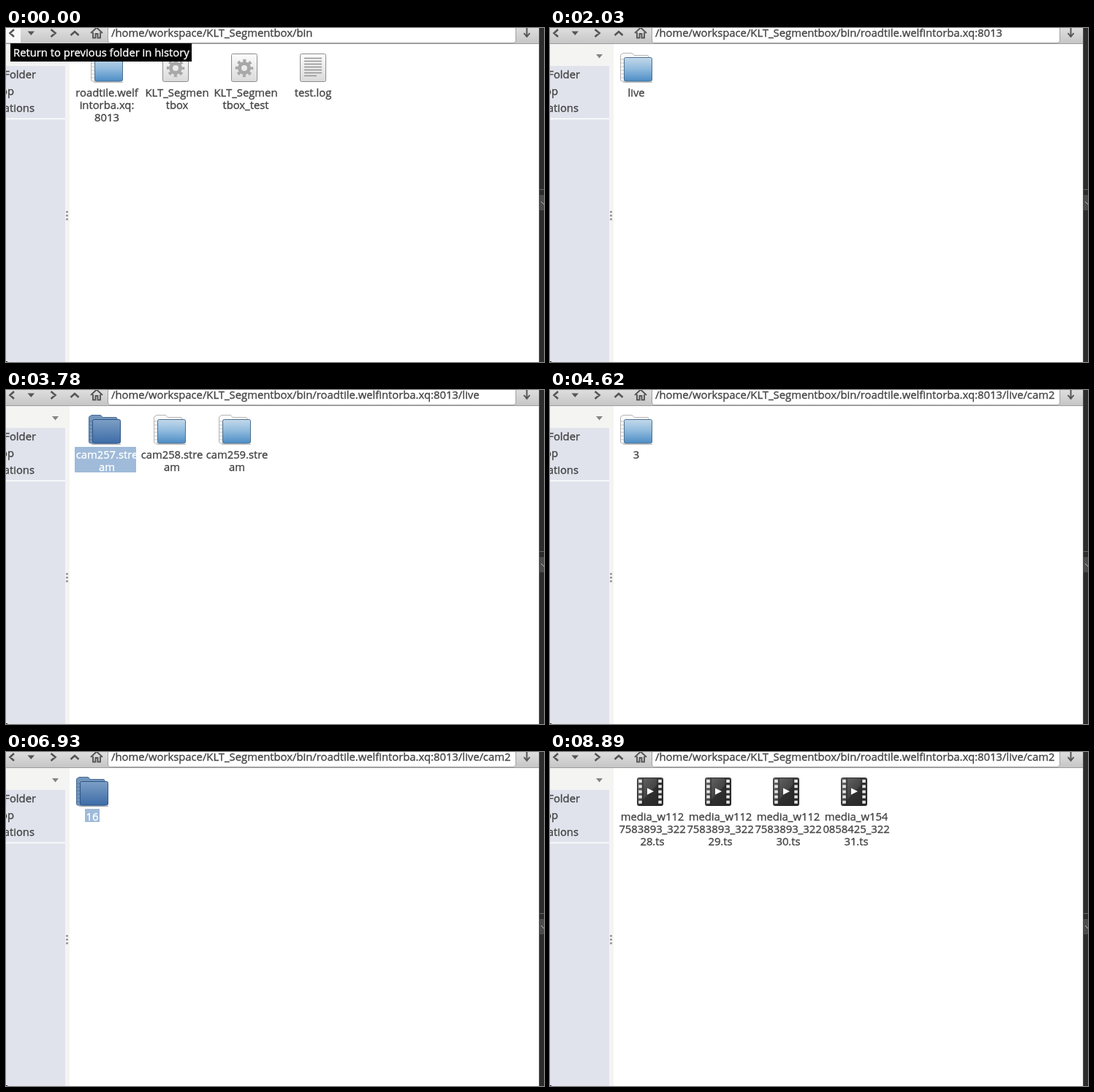
An HTML page for the animation above (9.1 s loop, 736 by 458 pixels).

```html
<!DOCTYPE html>
<html lang="en">
<head>
<meta charset="utf-8">
<style>
  html, body { margin: 0; width: 100%; height: 100%; overflow: hidden; background: #fff; }
  svg { display: block; width: 736px; height: 458px; font: 14.8px "Open Sans", "Noto Sans", sans-serif; color: #444; }
  text { fill: currentColor; stroke: currentColor; stroke-width: .35; }
  .line { fill: none; stroke: #555; stroke-width: 2.6; }
  .paper { fill: url(#paper); stroke: #8c8c8c; }
  .label { text-anchor: middle; }
</style>
</head>
<body>
<svg viewBox="0 0 736 458">
  <defs>
    <linearGradient id="bar" x2="0" y2="1"><stop stop-color="#dedede"/><stop offset="1" stop-color="#c6c6c6"/></linearGradient>
    <linearGradient id="paper" x2="0" y2="1"><stop stop-color="#fcfcfc"/><stop offset="1" stop-color="#dadada"/></linearGradient>
    <linearGradient id="blue" x2="0" y2="1"><stop stop-color="#c3d9ea"/><stop offset=".5" stop-color="#8db8dc"/><stop offset="1" stop-color="#4c8dc5"/></linearGradient>
    <linearGradient id="navy" x2="0" y2="1"><stop stop-color="#7c9fc5"/><stop offset="1" stop-color="#3d6ca8"/></linearGradient>
    <linearGradient id="dark" x2="1" y2="1"><stop stop-color="#6a6a6a"/><stop offset=".5" stop-color="#444"/><stop offset=".52" stop-color="#303030"/><stop offset="1" stop-color="#262626"/></linearGradient>
    <clipPath id="entry"><path d="M140 0H695V20H140z"/></clipPath>
    <path id="back" d="M-21.500 71V37.500q0-1.500 1.500-1.500l2-1.500h12.500l2.500 3h18q2 0 2 2V73H-19.500q-2 0-2-2z"/>
    <path id="ticks" d="M-21 43h4m-4 5h4m-4 5h4m-4 5h4m-4 5h4m-4 5h4"/>
    <g id="folder">
      <use href="#back" fill="#fafafa" stroke="#b4b4b4"/>
      <use href="#ticks" stroke="#c4c4c4"/>
      <rect x="-16.500" y="40.500" width="38" height="32.500" rx="2" fill="url(#blue)" stroke="#4d6f90"/>
      <path d="M-18 74.500H22" stroke="#bbb"/>
    </g>
    <g id="folderOn">
      <use href="#back" fill="#7396bd" stroke="#476a94"/>
      <use href="#ticks" stroke="#54779f"/>
      <rect x="-16.500" y="40.500" width="38" height="32.500" rx="2" fill="url(#navy)" stroke="#2f5484"/>
      <path d="M-18 74.500H22" stroke="#aaa"/>
    </g>
    <g id="gear">
      <rect class="paper" x="-17.500" y="35.500" width="35" height="38" rx="2"/>
      <g fill="none" stroke="#a8a8a8">
        <circle cy="55" r="6.500" stroke-width="5"/>
        <circle cy="55" r="10" stroke-width="4.500" stroke-dasharray="3.927" stroke-dashoffset="1.963"/>
      </g>
    </g>
    <g id="log">
      <rect class="paper" x="-17.500" y="35.500" width="35" height="38" rx="2"/>
      <path d="M-12 41.500h24m-24 4h24m-24 4h24m-24 4h24m-24 4h24m-24 4h24m-24 4h17" stroke="#929292" stroke-width="1.600"/>
    </g>
    <g id="film">
      <rect x="-17.500" y="35.500" width="35" height="38" rx="2" fill="url(#dark)" stroke="#2c2c2c"/>
      <path d="M-13.500 38V72M13.500 38V72" stroke="#e4e4e4" stroke-width="4.500" stroke-dasharray="4 3.200"/>
      <path d="M-10 36V73M10 36V73" stroke="#222"/>
      <path d="M-4 49.500L5 54l-9 4.500z" fill="#fff"/>
    </g>
  </defs>

  <path d="M0 0H736V458H0z" fill="#fff"/>
  <path d="M0 0H729V21H0z" fill="url(#bar)"/>
  <path d="M0 21.500H729" stroke="#9c9c9c"/>
  <path d="M0 22H87V458H0z" fill="#f4f4f3"/>
  <path d="M0 52H81V458H0z" fill="#e0e3ec"/>
  <path d="M0 124.500H81" stroke="#fff" stroke-width="1.500"/>
  <path d="M63 36h9l-4.500 5.500z" fill="#858585"/>
  <path d="M83.500 251v13" stroke="#999" stroke-width="3" stroke-dasharray="2.500 2.500"/>
  <g text-anchor="end">
    <text x="41" y="69">Folder</text>
    <text x="11" y="92">Desktop</text>
    <text x="39" y="115">Applications</text>
  </g>
  <path d="M0 457h2v1H0z" fill="#222"/>

  <path d="M729 0H736V458H729z" fill="#2c2c2c"/>
  <path d="M729.500 0V458" stroke="#555"/>
  <path d="M730 221.500h6" stroke="#666"/>
  <path d="M730 229h6v21h-6z" fill="#4c4c4c"/>
  <path d="M732 238l4 4" stroke="#bbb"/>

  <path id="pressed" d="M0 0H20V20H0z" fill="#f8f8f8"/>
  <path class="line" d="M11 2L5.500 7l5.500 5M61.500 2l6 5-6 5M88.500 10l5.500-5 5.500 5"/>
  <path d="M29.500 4.500h9.500l-4.700 5.500z" fill="#555"/>
  <path d="M116 7l8-7.500 8 7.500M119 6v7.500h3.500V8h3v5.500h3.500V6" fill="none" stroke="#555" stroke-width="1.900"/>
  <path d="M712.500 0v11M708.500 7l4 5 4-5" fill="none" stroke="#555" stroke-width="2"/>
  <path d="M139.500-2V17q0 3.500 3 3.500H694q3.500 0 3.500-3.500V-2z" fill="#fff" stroke="#a0a0a0"/>
  <text id="path" x="144" y="12" clip-path="url(#entry)"></text>
  <g id="files"></g>
  <g id="tip" color="#fff">
    <path d="M6 21H254V46H6z" fill="#000"/>
    <text x="10" y="39">Return to previous folder in history</text>
  </g>
</svg>
<script>
const LOOP = 9100, FADE = 280, STEP = 70;
const $ = id => document.getElementById(id);
const bin = '/home/workspace/KLT_Segmentbox/bin';
const host = bin + '/roadtile.welfintorba.xq:8013';
const live = host + '/live', cam = live + '/cam2';

// An item is [icon, centre x, label lines, label offset]
const single = name => [['folder', 118, name, 0]];
const clip = (x, first, second, third) => ['film', x, `${first}|${second}|${third}.ts`, 3];

// Each view opens at `start`; its first item is highlighted from `select` on
const views = [
  { start: 0, select: 1330, path: bin, items: [
    ['folder', 138, 'roadtile.welf|intorba.xq:|8013', 0],
    ['gear', 232, 'KLT_Segmen|tbox', 2],
    ['gear', 326, 'KLT_Segmen|tbox_test', 2],
    ['log', 420, 'test.log', 0]] },
  { start: 1610, select: 2660, path: host, items: single('live') },
  { start: 2940, select: 3500, path: live,
    items: [257, 258, 259].map((n, i) => ['folder', 135 + 89 * i, `cam${n}.stre|am`, 3]) },
  { start: 3850, select: 4200, path: cam, items: single('2018') },
  { start: 4550, select: 5600, path: cam, items: single('3') },
  { start: 5880, select: 6930, path: cam, items: single('16') },
  { start: 7350, select: LOOP, path: cam, items: [
    clip(137, 'media_w112', '7583893_322', '28'),
    clip(230, 'media_w112', '7583893_322', '29'),
    clip(323, 'media_w112', '7583893_322', '30'),
    clip(416, 'media_w154', '0858425_322', '31')] }
];

function drawItem([icon, x, label, offset], selected) {
  const lines = label.split('|');
  const centre = x + offset;
  const half = lines.length > 1 ? 42 : lines[0].length * 4 + 2;
  const highlight = selected
    ? `<rect x="${centre - half - (offset && 2)}" y="78" width="${half * 2}" height="${lines.length * 17 + 1}" fill="#9fbbd9"/>` : '';
  const text = lines.map((line, i) => `<text class="label" x="${centre}" y="${94 + 17 * i}">${line}</text>`).join('');
  return `<use href="#${icon}${selected ? 'On' : ''}" x="${x}"/>${highlight}<g color="${selected ? '#fff' : '#444'}">${text}</g>`;
}

let shown = '';
function render() {
  const t = performance.now() % LOOP;
  const view = views.findLast(v => t >= v.start);
  const selected = t >= view.select;
  const key = view.start + '/' + selected;
  if (key !== shown) {
    shown = key;
    $('path').textContent = view.path;
    $('files').innerHTML = view.items.map((item, i) => drawItem(item, selected && i === 0)).join('');
  }
  const fade = Math.max(0, 1 - Math.floor(t / STEP) * STEP / FADE);
  $('tip').setAttribute('opacity', fade);
  $('pressed').setAttribute('opacity', fade);
  requestAnimationFrame(render);
}
render();
</script>
</body>
</html>
```
